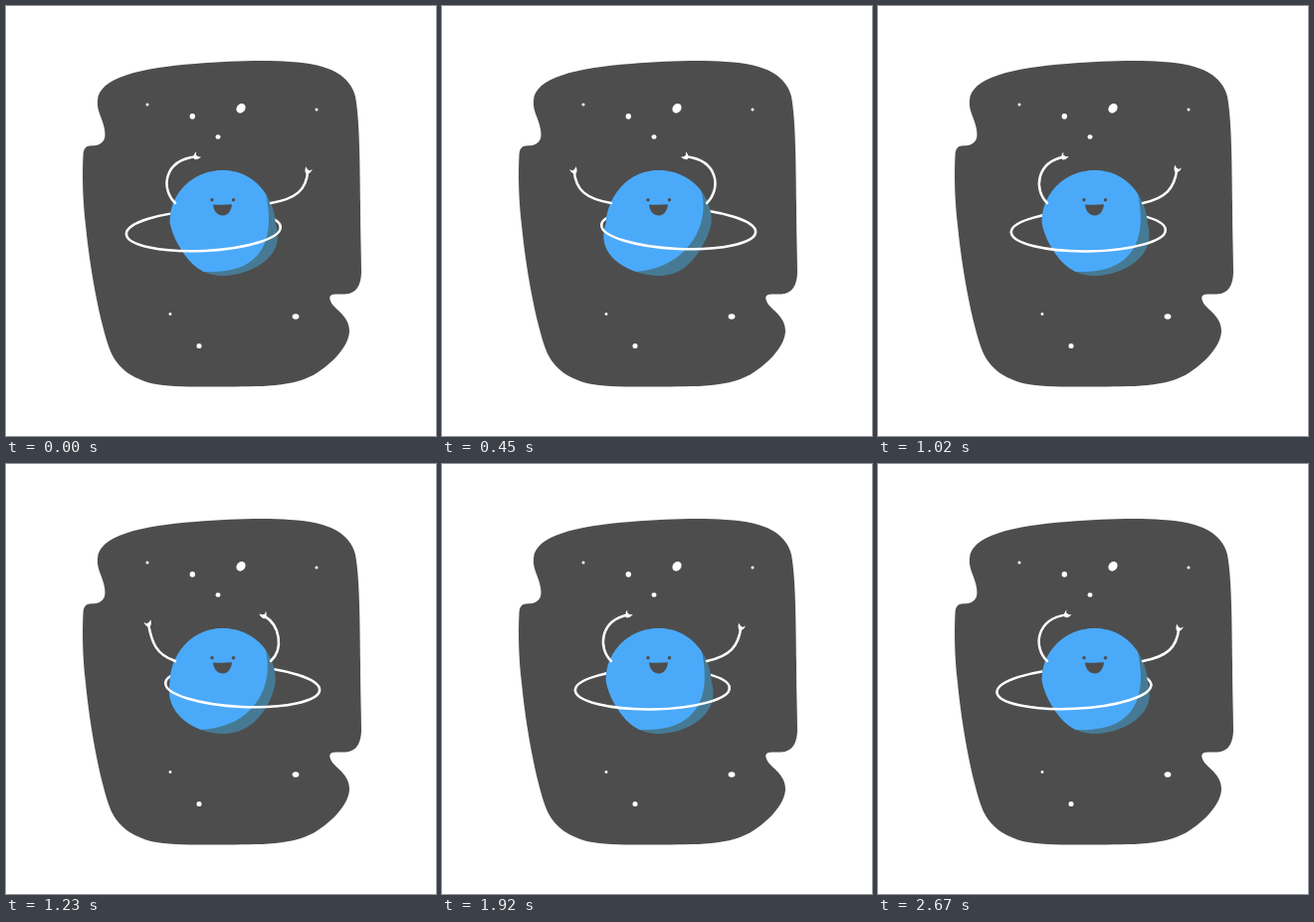
Animation of 432x432 px, one loop 2700 ms. Source, as an HTML page with a canvas:

```html
<!DOCTYPE html>
<html lang="en">
<head>
<meta charset="utf-8">
<title>Dancing planet</title>
<style>
  html, body { margin: 0; width: 100%; height: 100%; overflow: hidden; background: #fff; }
  canvas { display: block; width: 432px; height: 432px; }
</style>
</head>
<body>
<canvas id="stage"></canvas>
<script>
const LOOP = 2700, STEP = 30, BEAT = 900, TAU = Math.PI * 2;
const DARK = '#4d4d4d', BLUE = '#4ba9f9', SHADE = '#467a94', WHITE = '#fff';

const canvas = document.getElementById('stage');
const ctx = canvas.getContext('2d');
const ratio = window.devicePixelRatio || 1;
canvas.width = canvas.height = 432 * ratio;

const sky = new Path2D(`M92 95 C93 72 135 62 190 58 C225 55 262 54 285 56
  C327 58 346 71 351 91 C355.5 115 355.5 160 356 200 C356 230 357 250 357 268
  C356 290 344 290 333 289.5 C325 289 323 292 328 300 C334 307 345 313 345 327
  C344 343 327 359 314 367.5 C290 384 255 382 215 382.5 C185 382.7 162 382.5 148 379.5
  C125 374 112 363 105 347 C94 318 84 262 80 220 C77 195 76.5 170 77.5 150
  C78.5 137 86 142 93 139.3 C100 136 100 131 99 124 C97 112 91 106 92 95 Z`);
const mouth = new Path2D('M208 199.4 Q217 200 227 199.2 C226.6 206 222.5 210.4 218 210.4 C212.5 210.4 208.6 206 208 199.4 Z');
const hand = new Path2D('M0 3 Q-3.2 2 -3.8 -3.2 L-1.5 -0.8 L0.4 -1 L3.4 -3.6 Q3.6 1 1 3 Z');

// x, y, rx, ry, rotation
const stars = [
  [142, 99, 1.5, 1.5, 0], [187.3, 110.8, 2.7, 2.9, 0], [236, 102.8, 5.2, 4.2, -0.9],
  [312, 104, 1.5, 1.5, 0], [213, 131.5, 2.5, 2.3, 0], [165, 309.5, 1.4, 1.4, 0],
  [194, 341.5, 2.5, 2.6, 0], [291, 312, 3.4, 2.7, 0]
];

// Arm poses: two control points, hand position, hand angle
const armIn = [155.5, 184, 157.5, 155, 191.6, 151.3, 0.9];
const armUp = [156, 189, 157, 171, 159, 155.5, 0];
const armOut = [144, 193.5, 134, 185, 132.4, 166, -0.35];

const clamp = v => Math.max(0, Math.min(1, v));
const mix = (a, b, k) => a + (b - a) * k;
const wave = (t, peak) => Math.cos(TAU * (t - peak) / BEAT);

function fillEllipse(x, y, rx, ry, angle = 0) {
  ctx.beginPath();
  ctx.ellipse(x, y, rx, ry, angle, 0, TAU);
  ctx.fill();
}

function drawShootingStar(t) {
  const head = clamp((t - 1380) / 240), tail = clamp((t - 1470) / 240);
  if (head <= tail) return;
  const at = k => [mix(76, 303, k), mix(236, 56.5, k)];
  const [hx, hy] = at(head), [tx, ty] = at(tail), [mx, my] = at(mix(tail, head, 0.75));
  const nx = 2.9 * 0.62, ny = 2.9 * 0.78;
  ctx.beginPath();
  ctx.moveTo(tx, ty);
  ctx.quadraticCurveTo(mx - nx, my - ny, hx, hy);
  ctx.quadraticCurveTo(mx + nx, my + ny, tx, ty);
  ctx.fill();
  ctx.lineWidth = 1;
  ctx.stroke();
}

function drawSky(t) {
  ctx.fillStyle = DARK;
  ctx.fill(sky);
  ctx.fillStyle = ctx.strokeStyle = WHITE;
  for (const star of stars) fillEllipse(...star);
  ctx.save();
  ctx.clip(sky);
  drawShootingStar(t);
  ctx.restore();
}

function drawRing(t, from, to) {
  const q = wave(t, -60);
  ctx.strokeStyle = WHITE;
  ctx.lineWidth = 2.5;
  ctx.beginPath();
  ctx.ellipse(218 - 21.5 * q, 225.9 + 1.1 * q - 1.5 * q * q, 77.5, 20.3, -0.05 * q, from, to);
  ctx.stroke();
}

function drawPlanet(sway) {
  ctx.save();
  ctx.beginPath();
  for (let i = 0; i < 120; i++) {
    const a = TAU * i / 120, c = Math.cos(a), s = Math.sin(a);
    // The lower half leans with the sway, the upper half hardly moves
    const lean = sway * s * c * c * (c * sway > 0 ? 17 : 11) * (s < 0 ? 0.15 : 1);
    ctx.lineTo(217.7 + 53 * c + lean, 218 + 53 * s);
  }
  ctx.closePath();
  ctx.fillStyle = SHADE;
  ctx.fill();
  ctx.clip();
  const k = (sway + 1) / 2;
  ctx.beginPath();
  ctx.moveTo(260, 184);
  ctx.bezierCurveTo(271, mix(218, 230, k), mix(247, 262, k), mix(264, 270, k), mix(193, 200, k), 267);
  ctx.lineTo(180, 290);
  ctx.lineTo(140, 290);
  ctx.lineTo(140, 150);
  ctx.lineTo(245, 150);
  ctx.closePath();
  ctx.fillStyle = BLUE;
  ctx.fill();
  ctx.restore();

  ctx.fillStyle = DARK;
  fillEllipse(207, 194.8, 1.7, 1.8);
  fillEllipse(228.5, 194.8, 1.7, 1.8);
  ctx.fill(mouth);
}

function drawArm(sway) {
  const pose = armUp.map((mid, i) =>
    mid + sway * (armIn[i] - armOut[i]) / 2 + sway * sway * ((armIn[i] + armOut[i]) / 2 - mid));
  const [ax, ay, bx, by, x, y, angle] = pose;
  ctx.strokeStyle = ctx.fillStyle = WHITE;
  ctx.lineWidth = 2.5;
  ctx.lineCap = 'round';
  ctx.beginPath();
  ctx.moveTo(170, 198);
  ctx.bezierCurveTo(ax, ay, bx, by, x, y);
  ctx.stroke();
  ctx.save();
  ctx.translate(x, y);
  ctx.rotate(angle);
  ctx.fill(hand);
  ctx.restore();
}

function draw(t) {
  const q = wave(t, 30);
  const sway = q * (1 + 0.2 * (1 - q * q));
  ctx.setTransform(ratio, 0, 0, ratio, 0, 0);
  ctx.fillStyle = WHITE;
  ctx.fillRect(0, 0, 432, 432);
  drawSky(t);
  drawRing(t, Math.PI, TAU);
  drawPlanet(sway);
  drawArm(sway);
  ctx.save();
  ctx.translate(436, 0);
  ctx.scale(-1, 1);
  drawArm(-sway);
  ctx.restore();
  drawRing(t, 0, Math.PI);
}

const start = performance.now();
function tick() {
  const t = (performance.now() - start) % LOOP;
  draw(Math.floor(t / STEP) * STEP);
  requestAnimationFrame(tick);
}
tick();
</script>
</body>
</html>
```
